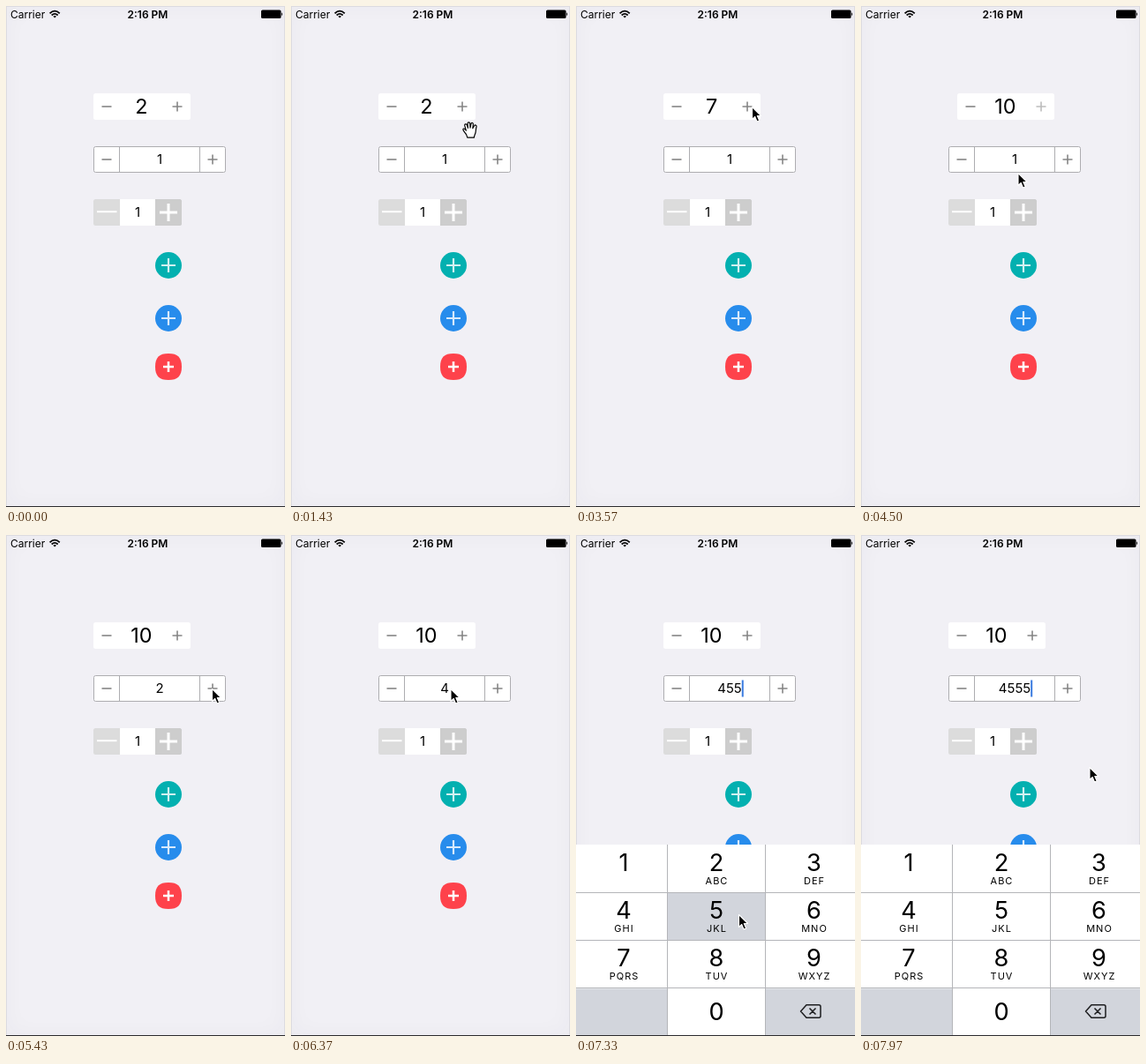
These frames come from a looping animation (316 px wide and 568 px high, 8000 ms). An HTML page:

```html
<!DOCTYPE html>
<html lang="en">
<head>
<meta charset="utf-8">
<title>Number steppers</title>
<style>
  html, body { margin: 0; width: 100%; height: 100%; overflow: hidden; background: #f1f0f5; }
  svg {
    display: block; width: 316px; height: 568px; background: #f1f0f5;
    box-shadow: inset 0 0 26px rgba(60, 60, 90, .035);
    font-family: Inter, Roboto, "Liberation Sans", sans-serif;
  }
  text { text-anchor: middle; fill: #000; }
  .value { font-size: 15px; }
  .digit { font-size: 27.2px; }
  .letters { font-size: 11px; letter-spacing: 1px; }
  .line { fill: none; }
</style>
</head>
<body>
<svg viewBox="0 0 316 568">
  <defs>
    <path id="minusIcon" class="line" d="M-5.5 0H5.5" stroke="#858585" stroke-width="1.6"/>
    <path id="plusIcon" class="line" d="M-5.5 0H5.5M0-5.5V5.5" stroke="#858585" stroke-width="1.6"/>
    <path id="bigPlus" class="line" d="M-8 0H8M0-8V8" stroke="#fff" stroke-width="2.2" opacity=".82"/>
  </defs>

  <!-- window edges -->
  <path class="line" d="M0 .5H316M.5 0V568M315.5 0V568" stroke="#dcdbe0"/>

  <!-- status bar -->
  <text x="5" y="14" font-size="12" style="text-anchor:start">Carrier</text>
  <text x="160.5" y="14" font-size="12" font-weight="600">2:16 PM</text>
  <path class="line" d="M49.6 8.3Q55.2 3 60.8 8.3M51.7 10.5Q55.2 7.2 58.7 10.5" stroke="#000" stroke-width="1.8"/>
  <path d="M55.2 13.6L53.4 11.7Q55.2 10.2 57 11.7Z"/>
  <rect x="289" y="4.5" width="22.5" height="9.5" rx="1.6"/>
  <path d="M312.2 7.2q2 2 0 4z"/>

  <!-- first stepper -->
  <g id="first">
    <rect x="99" y="99" width="110" height="30" rx="2.5" fill="#fff"/>
    <use href="#minusIcon" x="114" y="114"/>
    <use id="plus" href="#plusIcon" x="194" y="114"/>
    <text id="count" x="153.5" y="122.3" font-size="23.4"></text>
  </g>

  <!-- second stepper -->
  <rect x="99.5" y="159.5" width="149" height="29" rx="2" fill="#fff" stroke="#adadb0"/>
  <path class="line" d="M128.5 159V189M219.5 159V189" stroke="#adadb0"/>
  <use href="#minusIcon" x="114" y="174"/>
  <use href="#plusIcon" x="234" y="174"/>
  <text id="field" class="value" x="174" y="179.4"></text>
  <rect id="caret" y="164.5" width="2" height="19" fill="#3a7be0"/>

  <!-- third stepper -->
  <rect x="99" y="219" width="100" height="30" rx="2.5" fill="#dcdcdc"/>
  <rect x="160" y="219" width="39" height="30" rx="2.5" fill="#cdcdcd"/>
  <rect x="129" y="219" width="40" height="30" fill="#fff"/>
  <path class="line" d="M103 233.2H125.5" stroke="#fff" stroke-width="2"/>
  <path class="line" d="M174 234H194M184 224V244" stroke="#fff" stroke-width="3"/>
  <text class="value" x="149" y="239.4">1</text>

  <!-- round buttons -->
  <circle cx="184" cy="294" r="15" fill="#03b0b0"/>
  <use href="#bigPlus" x="184" y="294"/>
  <circle cx="184" cy="354" r="15" fill="#278cec"/>
  <use href="#bigPlus" x="184" y="354"/>
  <path d="M184 394C194.5 394 199 398.5 199 409S194.5 424 184 424 169 419.5 169 409 173.5 394 184 394Z" fill="#fe424b"/>
  <path class="line" d="M178 409H190M184 403V415" stroke="#fff" stroke-width="2.5"/>

  <g id="keyboard"></g>
  <rect y="567" width="316" height="1" fill="#2b2b2e"/>

  <g id="hand">
    <path transform="scale(1.08)" fill="#fff" stroke="#000" stroke-width="1.1" stroke-linejoin="round"
      d="M-3 8L-4 5C-5 3-8 .5-7.5-.8C-7-2-5.3-1.2-4.3.6L-5.8-4.5C-6.2-6.3-4-6.9-3.4-5.2L-2.4-2L-2.7-6.6C-2.7-8.4-.5-8.5-.3-6.8L0-2.2L.9-6.5C1.3-8.1 3.3-7.6 3.1-6L2.6-1.6L4.3-4.4C5.2-5.8 7-4.8 6.5-3.2C5.8-1 6 1 5.5 3C5 5 4 6 4 8Z"/>
  </g>
  <path id="arrow" stroke="#fff" stroke-width="1.1" stroke-linejoin="round"
    d="M.5 .5V14.5L3.7 11.5L6 17L8.6 15.9L6.3 10.5H10.6Z"/>
</svg>

<script>
const LOOP = 8000;
const $ = id => document.getElementById(id);
const clamp = (v, lo = 0, hi = 1) => Math.min(hi, Math.max(lo, v));
const smooth = v => v * v * (3 - 2 * v);

function buildKeyboard() {
  const edges = [0, 104, 215, 316], mids = [54, 159, 269.5];
  const letters = ["", "ABC", "DEF", "GHI", "JKL", "MNO", "PQRS", "TUV", "WXYZ"];
  let out = '<rect y="351" width="316" height="217" fill="#d2d5dc"/>';
  const addKey = (col, row, label, sub) => {
    const y = 351 + row * 54.2;
    out += `<rect id="key${label}" x="${edges[col]}" y="${y}" width="${edges[col + 1] - edges[col]}" height="55" fill="#fff"/>
      <text class="digit" x="${mids[col]}" y="${y + (sub === null ? 36 : 29.8)}">${label}</text>
      <text class="letters" x="${mids[col] + .5}" y="${y + 45}">${sub || ""}</text>`;
  };
  letters.forEach((sub, i) => addKey(i % 3, Math.floor(i / 3), i + 1, sub));
  addKey(1, 3, 0, null);
  out += `<path class="line" stroke="#b4b5b9" d="M0 405.5H316M0 459.5H316M0 513.5H316M103.5 351V568M214.5 351V568"/>
    <path class="line" stroke="#1c1c1e" stroke-width="1.5" stroke-linejoin="round"
      d="M254.5 540L261 532.8H275Q277 532.8 277 534.8V545.2Q277 547.2 275 547.2H261ZM264.5 536.5L271.5 543.5M271.5 536.5L264.5 543.5"/>`;
  $("keyboard").innerHTML = out;
}

// Pointer moves: start, end, x, y
const moves = [
  [1030, 1430, 203, 140.5], [1430, 1700, 199, 114], [4170, 4500, 177.5, 189],
  [4500, 4830, 248, 192], [4830, 4970, 233, 174], [5770, 6300, 180.5, 174],
  [6600, 6940, 184, 430], [7600, 7960, 258.5, 263]
];

function pointer(t) {
  let x = 281, y = 215;
  for (const [from, to, toX, toY] of moves) {
    const k = smooth(clamp((t - from) / (to - from)));
    x += (toX - x) * k;
    y += (toY - y) * k;
  }
  return [x, y];
}

// Taps on plus speed up after the fifth one
function counter(t) {
  if (t < 2630) return 2;
  return Math.min(10, t < 3700 ? 3 + (t - 2630) / 214 : 8 + (t - 3700) / 130);
}

const shaking = t => t >= 4010 && t < 4570;
const shake = t => !shaking(t) ? 0 : Math.floor((t - 4010) / 70) % 2 ? 10 : -10;

// Three taps on key 5, one every 240 ms
const TAP = 240, FIRST_TAP = 6990;
const tapCount = t => clamp(Math.floor((t - FIRST_TAP) / TAP) + 1, 0, 3);
const keyDown = t => t >= FIRST_TAP && t < FIRST_TAP + 3 * TAP && (t - FIRST_TAP) % TAP < 150;

function fieldText(t) {
  const n = clamp(Math.floor((t - 5430) / 70) + 2, 1, 4);
  return n + "5".repeat(tapCount(t));
}

const show = (el, on) => el.setAttribute("visibility", on ? "visible" : "hidden");
const move = (el, x, y) => el.setAttribute("transform", `translate(${x} ${y})`);

function draw(t) {
  const count = counter(t);
  $("count").textContent = Math.floor(count);
  move($("first"), shake(t), 0);
  $("plus").setAttribute("opacity", shaking(t) || (count < 10 && count % 1 > 0 && count % 1 < .3) ? .55 : 1);

  $("field").textContent = fieldText(t);
  show($("caret"), t >= 6480);
  $("caret").setAttribute("x", 174 + $("field").getComputedTextLength() / 2);

  const rise = 1 - (1 - clamp((t - 6480) / 370)) ** 3;
  show($("keyboard"), rise > 0);
  move($("keyboard"), 0, 217 * (1 - rise));
  $("key5").setAttribute("fill", keyDown(t) ? "#d2d5dc" : "#fff");

  const [x, y] = pointer(t);
  show($("hand"), t >= 1030 && t < 2630);
  show($("arrow"), t >= 2630);
  move($("hand"), x, y);
  move($("arrow"), x, y);
}

buildKeyboard();
const start = performance.now();
function tick() {
  draw((performance.now() - start) % LOOP);
  requestAnimationFrame(tick);
}
tick();
</script>
</body>
</html>
```
